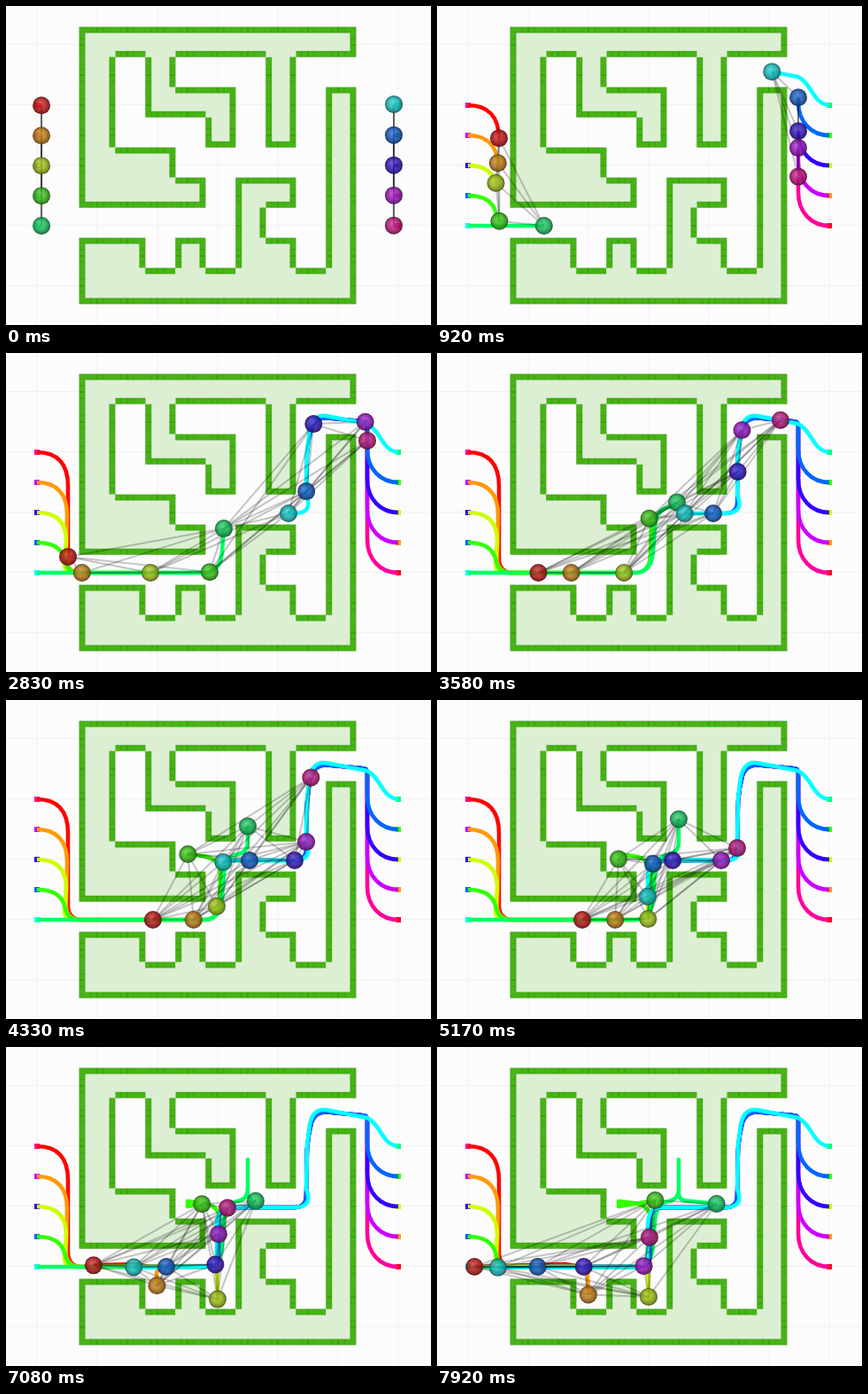
Animation, 480 px wide and 360 px high, one loop 8 s. Source, as an HTML page with a canvas:

```html
<!DOCTYPE html>
<html lang="en">
<head>
<meta charset="utf-8">
<style>
  html, body { margin: 0; width: 100%; height: 100%; overflow: hidden; background: #fdfcfd; }
  canvas { position: absolute; left: 0; top: 0; }
</style>
</head>
<body>
<canvas id="maze" width="480" height="360"></canvas>
<canvas id="robots" width="480" height="360"></canvas>
<script>
const LOOP = 8000;
const CELL = 6.8;
const cellX = i => 86 + CELL * i;
const cellY = j => 27 + CELL * j;
const hue = i => `hsl(${36 * i}, 100%, 50%)`;
const contextOf = id => document.getElementById(id).getContext('2d');

// ---- Maze: outlines in cells, alternating horizontal and vertical moves ----
function outline(startY, moves) {
  const corners = [[0, startY]];
  moves.forEach((value, k) => {
    const [x, y] = corners[k];
    corners.push(k % 2 ? [x, value] : [value, y]);
  });
  return corners;
}

const outlines = [
  outline(0, [45, 4, 35, 19, 31, 4, 15, 10, 25, 19, 21, 14, 11, 4, 5, 20, 15, 25, 20, 29, 0]),
  outline(35, [10, 40, 16, 35, 20, 40, 26, 25, 35, 29, 30, 35, 35, 40, 41, 10, 45, 45, 0])
];
const walls = new Path2D();
for (const corners of outlines) {
  corners.forEach(([x, y], k) => walls[k ? 'lineTo' : 'moveTo'](cellX(x), cellY(y)));
  walls.closePath();
}

function drawMaze() {
  const g = contextOf('maze');
  const square = (x, y, size, color) => {
    g.fillStyle = color;
    g.fillRect(cellX(x) - size / 2, cellY(y) - size / 2, size, size);
  };
  g.fillStyle = '#fdfcfd';
  g.fillRect(0, 0, 480, 360);
  g.fillStyle = '#f2f1f2';
  for (let x = 35; x < 480; x += 68) g.fillRect(x - 0.5, 0, 1, 360);
  for (let y = 43.5; y < 360; y += 68) g.fillRect(0, y - 0.5, 480, 1);
  g.fillStyle = '#dcefd3';
  g.fill(walls);

  for (const corners of outlines) {
    const n = corners.length;
    corners.forEach(([x, y], k) => {
      const [px, py] = corners[(k + n - 1) % n];
      const [nx, ny] = corners[(k + 1) % n];
      const inward = (x - px) * (ny - y) - (y - py) * (nx - x) < 0;
      const steps = Math.abs(nx - x) + Math.abs(ny - y);
      for (let s = 0; s < steps; s++) {
        const cx = x + Math.sign(nx - x) * s, cy = y + Math.sign(ny - y) * s;
        if (s === 0 && inward) {
          square(cx, cy, CELL, '#dcefd3');
        } else {
          square(cx, cy, CELL, '#2f9208');
          square(cx, cy, 5.8, '#46b512');
        }
      }
    });
  }
}

// ---- Robots: a route each, and the distance covered at shared times ----
const TIMES = [0, 1830, 2830, 4330, 5170, 6170, 7920];
const rightRoute = y => `M443 ${y} C423 ${y} 408 ${y - 15} 408 ${y - 38} L408 82
  Q408 77 402 77 L369 74 Q350 70 345 85 Q341 100 340 115 L339 168 Q339 181 326 181
  L256 181 Q240 181 240 196 L240 236 Q240 248 228 248 L41 248`;

const robots = [
  ['M35 112 C58 112 70 125 70 150 L70 232 Q70 248 86 248 L174 248 L162 248 L145 245 L41 248',
    [5, 105, 139, 247, 265, 283, 387]],
  ['M35 146 C58 146 69 160 69 182 L68 232 Q68 248 85 248 L217 248 L180 248 Q170 248 170 258 L171 281',
    [5, 95, 134, 260, 281, 316, 340]],
  ['M35 180 C56 180 68 190 68 212 L66 238 Q66 248 76 248 L225 248 Q238 248 238 234 L238 226 L239 286 L239 281',
    [5, 83, 182, 267, 295, 331, 338]],
  ['M35 214 C50 214 62 218 66 232 Q69 247 80 248 L224 248 Q240 248 241 228 L242 195 Q240 178 222 176 L205 174 L205 180 L247 173',
    [5, 104, 212, 315.6, 321.6, 321.6, 364]],
  ['M35 248 L225 248 Q242 247 244 225 L246 198 Q247 176 262 174 Q273 172 273 160 L273 127 L273 165 Q273 174 285 174 L316 177',
    [5, 165, 250, 319, 327, 353, 420.5]],
  ['M443 112 C424 110 424 88 408 80 L362 71 Q344 68 342 95 L340 111 L339 160 Q348 181 325 181 L255 181 Q239 180 238 200 L238 235 Q238 248 222 248 L41 249',
    [5, 153, 236, 310, 351, 395, 541]],
  [rightRoute(146), [5, 126, 227, 311, 343, 395, 529]],
  [rightRoute(180), [5, 114, 184, 294, 354, 379, 511]],
  [rightRoute(214), [5, 129, 157, 299, 333, 394, 477]],
  [rightRoute(248), [5, 134, 169, 260, 340, 395, 476]]
].map(([d, distances], i) => {
  const route = document.createElementNS('http://www.w3.org/2000/svg', 'path');
  route.setAttribute('d', d);
  return { i, route, trail: new Path2D(d), distanceAt: smooth(TIMES, distances) };
});
const trailOrder = [0, 1, 2, 3, 4, 9, 8, 7, 6, 5];

// Monotone cubic interpolation: no overshoot, and a standstill stays still.
function smooth(xs, ys) {
  const last = xs.length - 1;
  const secants = xs.slice(1).map((x, k) => (ys[k + 1] - ys[k]) / (x - xs[k]));
  const slopes = xs.map((_, k) => {
    if (k === 0) return secants[0];
    if (k === last) return secants[last - 1];
    const a = secants[k - 1], b = secants[k];
    return a * b > 0 ? 2 * a * b / (a + b) : 0;
  });
  return x => {
    if (x >= xs[last]) return ys[last] + slopes[last] * (x - xs[last]);
    const k = xs.findIndex((_, j) => x < xs[j + 1]);
    const h = xs[k + 1] - xs[k], u = (x - xs[k]) / h, v = 1 - u;
    return ys[k] * v * v * (1 + 2 * u) + ys[k + 1] * u * u * (1 + 2 * v)
      + h * u * v * (slopes[k] * v - slopes[k + 1] * u);
  };
}

const ctx = contextOf('robots');

function drawGoals() {
  for (let k = 0; k < 5; k++) {
    const y = 109 + 34 * k;
    ctx.fillStyle = hue(9 - k);
    ctx.fillRect(32, y, 6, 6);
    ctx.fillStyle = hue(4 - k);
    ctx.fillRect(440, y, 6, 6);
  }
}

function drawTrail({ i, trail }, distance) {
  ctx.strokeStyle = hue(i);
  ctx.lineWidth = 4.5;
  ctx.lineJoin = 'round';
  ctx.setLineDash([distance, 2000]);
  ctx.stroke(trail);
  ctx.setLineDash([]);
}

// Walls weaken the signal, so they shorten the range of a link.
function linked(a, b) {
  const length = Math.hypot(a.x - b.x, a.y - b.y);
  if (length > 260) return false;
  const samples = 40;
  let blocked = 0;
  for (let s = 0; s < samples; s++) {
    const u = (s + 0.5) / samples;
    if (ctx.isPointInPath(walls, a.x + (b.x - a.x) * u, a.y + (b.y - a.y) * u)) blocked++;
  }
  return length * (1 + 0.35 * blocked / samples) < 260;
}

function drawLinks(points) {
  ctx.strokeStyle = 'rgba(0, 0, 0, 0.22)';
  ctx.lineWidth = 2;
  points.forEach((a, i) => points.slice(i + 1).forEach(b => {
    if (!linked(a, b)) return;
    ctx.beginPath();
    ctx.moveTo(a.x, a.y);
    ctx.lineTo(b.x, b.y);
    ctx.stroke();
  }));
}

function drawBall({ x, y }, i) {
  const shade = ctx.createRadialGradient(x - 2, y - 3, 0, x, y, 10);
  const tone = (s, l, a) => `hsla(${36 * i}, ${s}%, ${l}%, ${a})`;
  shade.addColorStop(0, tone(60, 52, 0.82));
  shade.addColorStop(0.55, tone(75, 40, 0.86));
  shade.addColorStop(0.85, tone(75, 30, 0.92));
  shade.addColorStop(1, tone(60, 18, 0.95));
  ctx.fillStyle = shade;
  ctx.beginPath();
  ctx.arc(x, y, 10, 0, 2 * Math.PI);
  ctx.fill();
}

function frame() {
  const time = performance.now() % LOOP;
  const distances = robots.map(r => r.distanceAt(time));
  const points = robots.map((r, i) => r.route.getPointAtLength(distances[i]));
  ctx.clearRect(0, 0, 480, 360);
  drawGoals();
  trailOrder.forEach(i => drawTrail(robots[i], distances[i]));
  drawLinks(points);
  points.forEach(drawBall);
  requestAnimationFrame(frame);
}

drawMaze();
frame();
</script>
</body>
</html>
```
